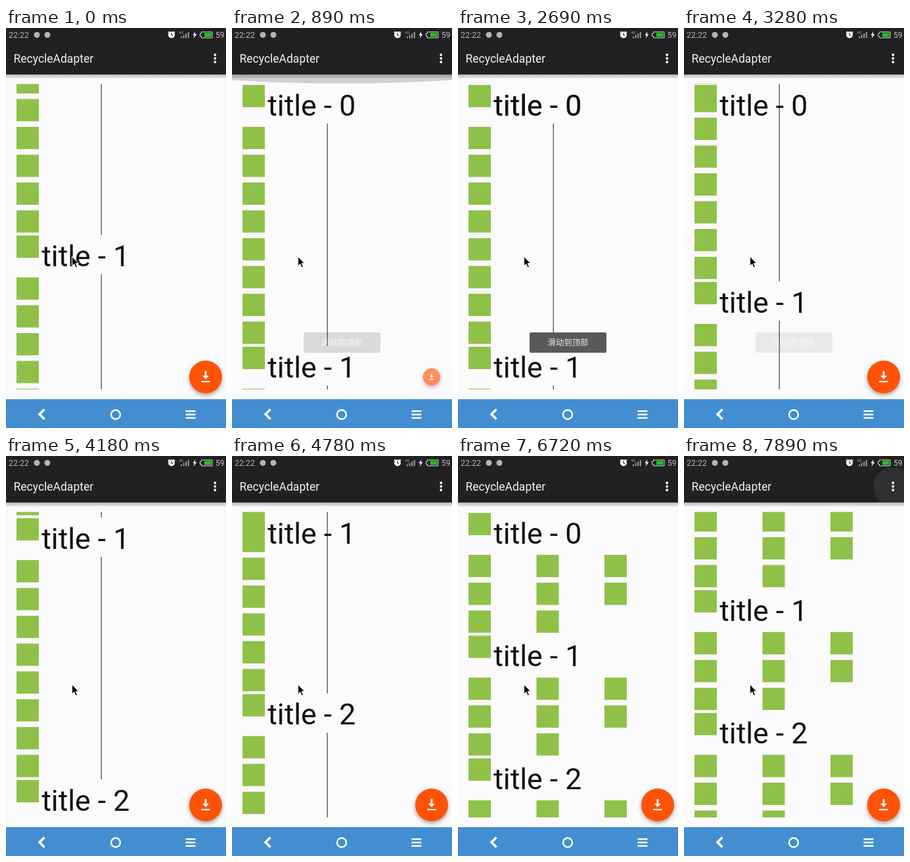
Write an HTML page with a canvas that moves like this. It is 335 px wide and 611 px high and loops after 8 s.

```html
<!DOCTYPE html>
<html lang="zh">
<head>
<meta charset="utf-8">
<style>
  html, body { margin: 0; width: 100%; height: 100%; overflow: hidden; background: #fbfafc; }
  canvas { display: block; }
</style>
</head>
<body>
<canvas id="stage" width="335" height="611"></canvas>
<script>
const stage = document.getElementById('stage');
const buffer = Object.assign(document.createElement('canvas'), { width: 335, height: 611 });
let ctx = stage.getContext('2d');
const LOOP = 8000, STEP = 149.1;
const FONT = 'Roboto, "Noto Sans CJK SC", "Noto Sans CJK", sans-serif';
const TOP = 86, BOTTOM = 552, ROW = 42.5, HEADER = 60, ITEMS = 8;
const MENU = ['线性布局横竖向切换', '多类型item', '线性布局LinearLayoutManager', '网格布局GridLayoutManager',
  '网格布局GridLayoutManager不带header', '固定头部', '固定头部带背景', '无header布局'];

// Keyframes are [step, value] pairs
const listScroll = [[0, 170], [5, 0]];
const stickyScroll = [[19, 0], [20, 25], [22, 99], [28, 392], [33, 556]];
const gridScroll = [[46, 0], [47, 18], [49, 58], [50, 69.5]];
const fabScale = [[5, 1], [6, .53], [7, 0], [19, 0], [20, .5], [21, 1]];
const toastAlpha = [[5, 0], [6, .2], [7, .75], [8, .95], [9, 1], [20, 1], [21, .6], [22, .1], [23, 0]];
const glowAlpha = [[4, 0], [5, .5], [6, 1], [7, .5], [8, 0]];
const menuAlpha = [[11, 0], [12, .6], [13, 1], [16, 1], [17, .5], [18, 0],
  [36, 0], [37, .6], [38, 1], [43, 1], [44, .5], [45, 0]];
const rippleSteps = [11, 35, 36, 53];

function valueAt(keys, x) {
  if (x <= keys[0][0]) return keys[0][1];
  for (let i = 1; i < keys.length; i++) {
    const [x0, v0] = keys[i - 1], [x1, v1] = keys[i];
    if (x <= x1) return v0 + (v1 - v0) * (x - x0) / (x1 - x0);
  }
  return keys[keys.length - 1][1];
}

function rect(x, y, w, h, color) {
  ctx.fillStyle = color;
  ctx.fillRect(x, y, w, h);
}

function circle(x, y, r, color) {
  ctx.fillStyle = color;
  ctx.beginPath();
  ctx.arc(x, y, r, 0, 7);
  ctx.fill();
}

function shape(path, fill, stroke, width) {
  const p = new Path2D(path);
  if (fill) { ctx.fillStyle = fill; ctx.fill(p); }
  if (stroke) { ctx.strokeStyle = stroke; ctx.lineWidth = width; ctx.stroke(p); }
}

function text(s, x, y, size, color) {
  ctx.font = `${size}px ${FONT}`;
  ctx.fillStyle = color;
  ctx.fillText(s, x, y);
}

function shadow(color, blur, y) {
  ctx.shadowColor = color;
  ctx.shadowBlur = blur;
  ctx.shadowOffsetY = y;
}

// Draws a group off screen, then fades it as a whole
function layer(alpha, draw) {
  if (alpha <= 0) return;
  const main = ctx;
  ctx = buffer.getContext('2d');
  ctx.clearRect(0, 0, 335, 611);
  ctx.save();
  draw();
  ctx.restore();
  ctx = main;
  ctx.globalAlpha = Math.min(alpha, 1);
  ctx.drawImage(buffer, 0, 0);
  ctx.globalAlpha = 1;
}

const icon = (x, y) => rect(x, y + 5, 34, 34, '#8fc149');

function header(n, y) {
  icon(16, y - 4);
  text('title - ' + n, 54.2, y + 47.5, 44.65, '#111');
}

function list(scroll, columns, sticky) {
  ctx.save();
  ctx.beginPath();
  ctx.rect(15, TOP - .5, 320, BOTTOM - TOP + .5);
  ctx.clip();
  const section = HEADER + Math.ceil(ITEMS / columns) * ROW;
  const headerY = n => TOP + n * section - scroll;
  for (let n = 0; headerY(n) < BOTTOM; n++) {
    const y = headerY(n);
    header(n, y);
    for (let i = 0; i < ITEMS; i++) {
      icon(16 + i % columns * 103.5, y + HEADER + Math.floor(i / columns) * ROW);
    }
    if (columns === 1) rect(144.6, y + HEADER, 1.2, section - HEADER, '#404040');
  }
  if (sticky) {
    const n = Math.floor(scroll / section);
    header(n, Math.min(TOP, headerY(n + 1) - HEADER));
  }
  ctx.restore();
}

function statusBar() {
  text('22:22', 4, 14.5, 12.4, '#b4b4b4');
  circle(47, 10.5, 4.5, '#b4b4b4');
  circle(63, 10.5, 4.5, '#b4b4b4');
  circle(252, 10.5, 5, '#fff');
  shape('M252 7.5V10.5L254 12', null, '#212123', 1.2);
  shape('M246.8 7.5L249 5.3M257.2 7.5L255 5.3', null, '#fff', 1.4);
  text('4G', 263.5, 9, 5.5, '#aaa');
  for (let i = 0; i < 4; i++) rect(266 + i * 3.6, 13 - i * 2.3, 2, 2.5 + i * 2.3, '#999');
  shape('M288.5 5L284.5 11H287L285.5 16L290.5 9.5H287.6Z', '#fff');
  shape('M297.5 6H314V15H297.5V12.5H295.5V8.5H297.5Z', null, '#ddd', 1);
  rect(302, 7.5, 10.5, 6, '#18c818');
  text('59', 319, 14.5, 12, '#c4c4c4');
}

function appBar(ripple) {
  const fade = ctx.createLinearGradient(0, 71, 0, 78);
  fade.addColorStop(0, 'rgba(0,0,0,.27)');
  fade.addColorStop(.6, 'rgba(0,0,0,.12)');
  fade.addColorStop(1, 'rgba(0,0,0,0)');
  rect(0, 71, 335, 7, fade);
  rect(0, 0, 335, 71, '#212123');
  if (ripple) {
    ctx.save();
    ctx.beginPath();
    ctx.rect(0, 0, 335, 71);
    ctx.clip();
    circle(318, 47, 29.5, '#303032');
    ctx.restore();
  }
  statusBar();
  text('RecycleAdapter', 11.5, 53, 17.5, '#f2f2f2');
  for (const y of [41, 46.5, 52]) circle(318.3, y, 1.9, '#fff');
}

function fab(scale) {
  layer(scale * 1.2, () => {
    ctx.translate(304, 533);
    ctx.scale(scale, scale);
    ctx.save();
    shadow('rgba(0,0,0,.35)', 6, 3);
    circle(0, 0, 25, '#ff5206');
    ctx.restore();
    shape('M-1.4 -9H1.4V-2H5L0 3.4L-5 -2H-1.4ZM-6.8 6H6.8V8.3H-6.8Z', '#fff');
  });
}

function toast() {
  ctx.beginPath();
  ctx.roundRect(109, 465, 117, 31, 2);
  ctx.fillStyle = '#59595b';
  ctx.fill();
  text('滑动到顶部', 136.5, 485, 12.4, '#eee');
}

function menu() {
  ctx.save();
  shadow('rgba(0,0,0,.45)', 9, 4);
  rect(53.5, 24.5, 282, 341, '#fafafb');
  ctx.restore();
  MENU.forEach((label, i) => text(label, 68, 51 + i * 42.6, 14.15, '#303030'));
}

function navBar() {
  rect(0, 567, 335, 44, '#428ed0');
  shape('M58.5 582.5L51 590L58.5 597.5', null, '#fff', 3.6);
  ctx.beginPath();
  ctx.arc(167, 590.5, 7, 0, 7);
  ctx.lineWidth = 2.4;
  ctx.stroke();
  for (const y of [584, 589.2, 594.4]) rect(273.5, y, 15, 2.4, '#fff');
}

function render(step) {
  rect(0, 0, 335, 611, '#fbfafc');
  if (step < 17) list(valueAt(listScroll, step), 1, false);
  else if (step < 44) list(valueAt(stickyScroll, step), 1, true);
  else list(valueAt(gridScroll, step), 3, false);

  layer(valueAt(glowAlpha, step), () => shape('M0 71V79.5Q167 90 335 79.5V71Z', 'rgba(0,0,0,.17)'));
  appBar(rippleSteps.includes(step));
  fab(valueAt(fabScale, step));
  layer(valueAt(menuAlpha, step), menu);
  layer(valueAt(toastAlpha, step), toast);
  navBar();
  shape('M100.5 349V363.5L103.8 360.5L106.2 366L108.6 365L106.2 359.6H110.6Z', '#000', '#fff', 1);
}

function tick() {
  const time = performance.now() % LOOP;
  render(Math.floor((time + 14) / STEP));
  requestAnimationFrame(tick);
}
tick();
</script>
</body>
</html>
```
